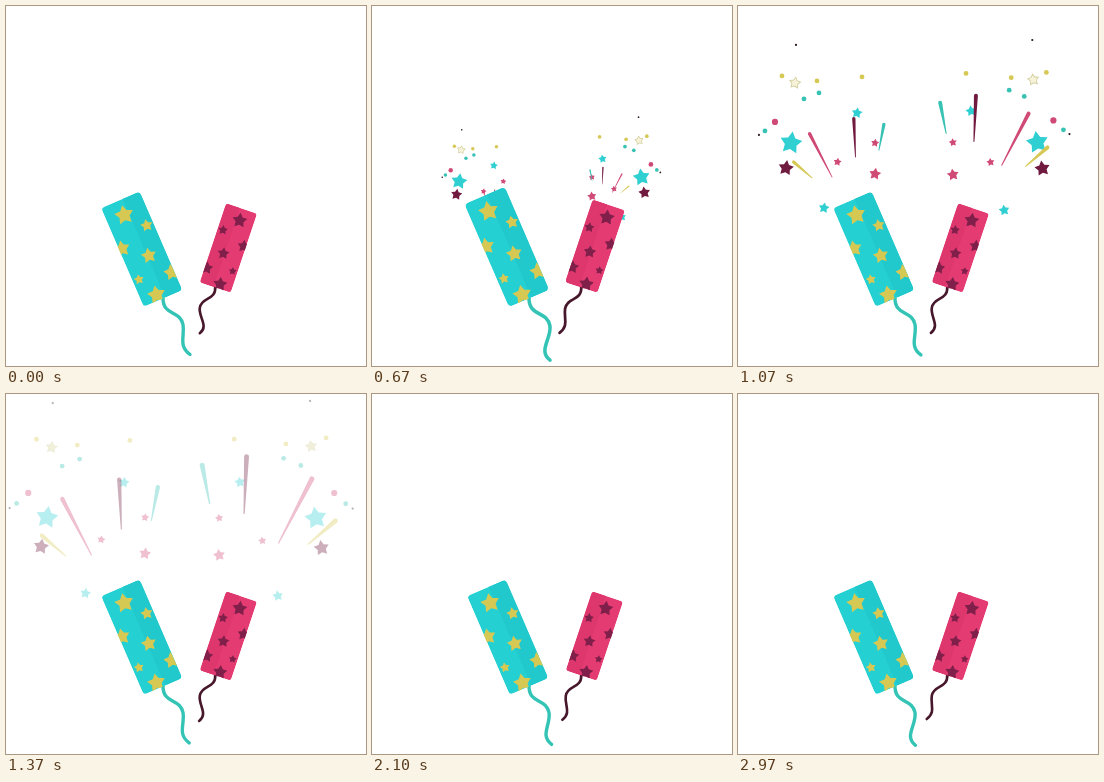
Write an HTML page with a canvas that moves like this. It is 360 by 360 pixels and loops after 3010 ms.

```html
<!DOCTYPE html>
<html lang="en">
<head>
<meta charset="utf-8">
<title>Party crackers</title>
<style>
  html, body { margin: 0; width: 100%; height: 100%; overflow: hidden; background: #fff; }
  canvas { display: block; width: 360px; height: 360px; }
</style>
</head>
<body>
<canvas id="stage" width="360" height="360"></canvas>
<script>
const ctx = document.getElementById('stage').getContext('2d');
const LOOP = 3010, SWING = 1230;
const TEAL = '#30cfd2', PINK = '#d04a76', DARK = '#701a40', GOLD = '#d6c854', MINT = '#38c2b4';

const clamp = v => Math.max(0, Math.min(1, v));
const ramp = (t, from, span) => clamp((t - from) / span);
const smooth = u => (1 - Math.cos(Math.PI * u)) / 2;
const easeOut = u => 1 - (1 - u) * (1 - u);

// Run a drawing step inside its own moved and scaled space
function within(x, y, sx, sy, paint) {
  ctx.save();
  ctx.translate(x, y);
  ctx.scale(sx, sy);
  paint();
  ctx.restore();
}

function star(x, y, r, color, turn = 0.15) {
  ctx.beginPath();
  for (let i = 0; i < 10; i++) {
    const d = i % 2 ? r * 0.54 : r, a = turn + i * Math.PI / 5;
    ctx.lineTo(x + d * Math.sin(a), y - d * Math.cos(a));
  }
  ctx.closePath();
  ctx.fillStyle = color;
  ctx.fill();
}

function dot(x, y, r, color) {
  ctx.beginPath();
  ctx.arc(x, y, r, 0, 2 * Math.PI);
  ctx.fillStyle = color;
  ctx.fill();
}

function paleStar(x, y, r) {
  star(x, y, r, '#cfca98');
  star(x, y, r * 0.75, '#f6f3da');
}

// Both crackers share one shape; the second is a smaller mirror image
const W = 42, H = 107.5;
const pattern = [[-2.5, -92, 10], [14, -73.5, 6.4], [-18, -62, 8.5], [4, -45, 8],
                 [18.5, -20.5, 8.5], [-14.5, -27, 5.2], [-4.5, -6, 9.5]];
const crackers = [
  { x: 157, y: 292.5, size: 1, flip: 1, tilt: -0.408, sway: 0,
    body: '#25d0d2', side: '#21c8cc', star: '#d6c953', tail: '#34c4b6' },
  { x: 209.3, y: 281.5, size: 0.775, flip: -1, tilt: -0.322, sway: 1,
    body: '#e43b72', side: '#dd376d', star: '#7f1f4a', tail: '#47182c' }
];

function drawTail(color, w) {
  const ex = 27 - 7 * w, ey = 56 + 3 * w;
  ctx.beginPath();
  ctx.moveTo(0, -2);
  ctx.bezierCurveTo(-1, 18, 17, 11, 20, 26);
  ctx.bezierCurveTo(22, 38, ex - 12, ey - 9, ex, ey);
  ctx.strokeStyle = color;
  ctx.lineWidth = 3.4;
  ctx.lineCap = 'round';
  ctx.stroke();
}

function drawCracker(c, swell, swing) {
  const s = c.size * swell;
  within(c.x, c.y, s * c.flip, s, () => {
    drawTail(c.tail, Math.abs(c.sway - swing));
    ctx.rotate(c.tilt);
    ctx.beginPath();
    ctx.roundRect(-W / 2, -H, W, H, 4);
    ctx.clip();
    ctx.fillStyle = c.body;
    ctx.fillRect(-W / 2, -H, W, H);
    ctx.fillStyle = c.side;
    ctx.fillRect(W * 0.06, -H, W / 2, H);
    for (const [x, y, r] of pattern) star(x, y, r, c.star, 0.2);
  });
}

// Confetti places are offsets from the burst center at unit spread
const confetti = [
  { draw: dot, r: 2.4, color: GOLD, at: [[-81, -148], [-46, -143], [-1, -147]] },
  { draw: dot, r: 2.4, color: MINT, at: [[-44, -131], [-59, -125], [-98, -93]] },
  { draw: dot, r: 3.1, color: PINK, at: [[-88, -102]] },
  { draw: dot, r: 1.1, color: '#2c1a22', at: [[-67, -179], [-104, -89]] },
  { draw: star, r: 11.5, color: TEAL, at: [[-72, -81]] },
  { draw: star, r: 5.6, color: TEAL, at: [[-6, -111], [-39, -16]] },
  { draw: star, r: 8, color: DARK, at: [[-77, -56]] },
  { draw: star, r: 4.2, color: PINK, at: [[12, -81], [-25.5, -62]] },
  { draw: star, r: 6.2, color: PINK, at: [[12, -50]] },
  { draw: paleStar, r: 6.5, at: [[-68, -141]] }
];

// Streak head and tail as offsets from the streak center
const streaks = [
  { head: [-11, -113], end: [-9, -67], color: DARK },
  { head: [25, -106], end: [19, -75], color: MINT },
  { head: [-64, -95], end: [-37, -43], color: PINK },
  { head: [-83, -61], end: [-61, -42], color: GOLD }
];

const bursts = [
  { x: 125, y: 218, flip: 1, tall: 1, delay: 380, reach: 1.19, rayY: 207, rayDelay: 575, rayReach: 1.12 },
  { x: 227, y: 221, flip: -1, tall: 1.04, delay: 310, reach: 1.17, rayY: 202, rayDelay: 510, rayReach: 1.28 }
];

function drawConfetti(k, tall) {
  const grow = Math.min(1, Math.sqrt(k));
  for (const g of confetti)
    for (const [x, y] of g.at) g.draw(x * k, y * k * tall, g.r * grow, g.color);
}

function drawStreaks() {
  for (const { head: [hx, hy], end: [tx, ty], color } of streaks) {
    const a = Math.atan2(hy - ty, hx - tx), q = Math.PI / 2;
    ctx.beginPath();
    ctx.arc(hx, hy, 2, a - q, a + q);
    ctx.arc(tx, ty, 0.5, a + q, a + 3 * q);
    ctx.fillStyle = color;
    ctx.fill();
  }
}

function drawBurst(b, t) {
  const k = b.reach * easeOut(ramp(t, b.delay, 1530 - b.delay));
  const ray = b.rayReach * easeOut(ramp(t, b.rayDelay, 1575 - b.rayDelay));
  if (k > 0) within(b.x, b.y, b.flip, 1, () => drawConfetti(k, b.tall));
  if (ray > 0) within(b.x, b.rayY, b.flip * ray, ray, drawStreaks);
}

function draw(t) {
  ctx.clearRect(0, 0, 360, 360);
  ctx.globalAlpha = 1 - ramp(t, 1130, 370);
  if (ctx.globalAlpha > 0) for (const b of bursts) drawBurst(b, t);
  ctx.globalAlpha = 1;

  const pop = t < 500 ? smooth(ramp(t, 250, 250)) : 1 - smooth(ramp(t, 500, 320));
  const swing = (1 - Math.cos(2 * Math.PI * t / SWING)) / 2;
  for (const c of crackers) drawCracker(c, 1 + 0.1 * pop, swing);
}

const start = performance.now();
function tick(now) {
  draw(Math.max(0, now - start) % LOOP);
  requestAnimationFrame(tick);
}
draw(0);
requestAnimationFrame(tick);
</script>
</body>
</html>
```
